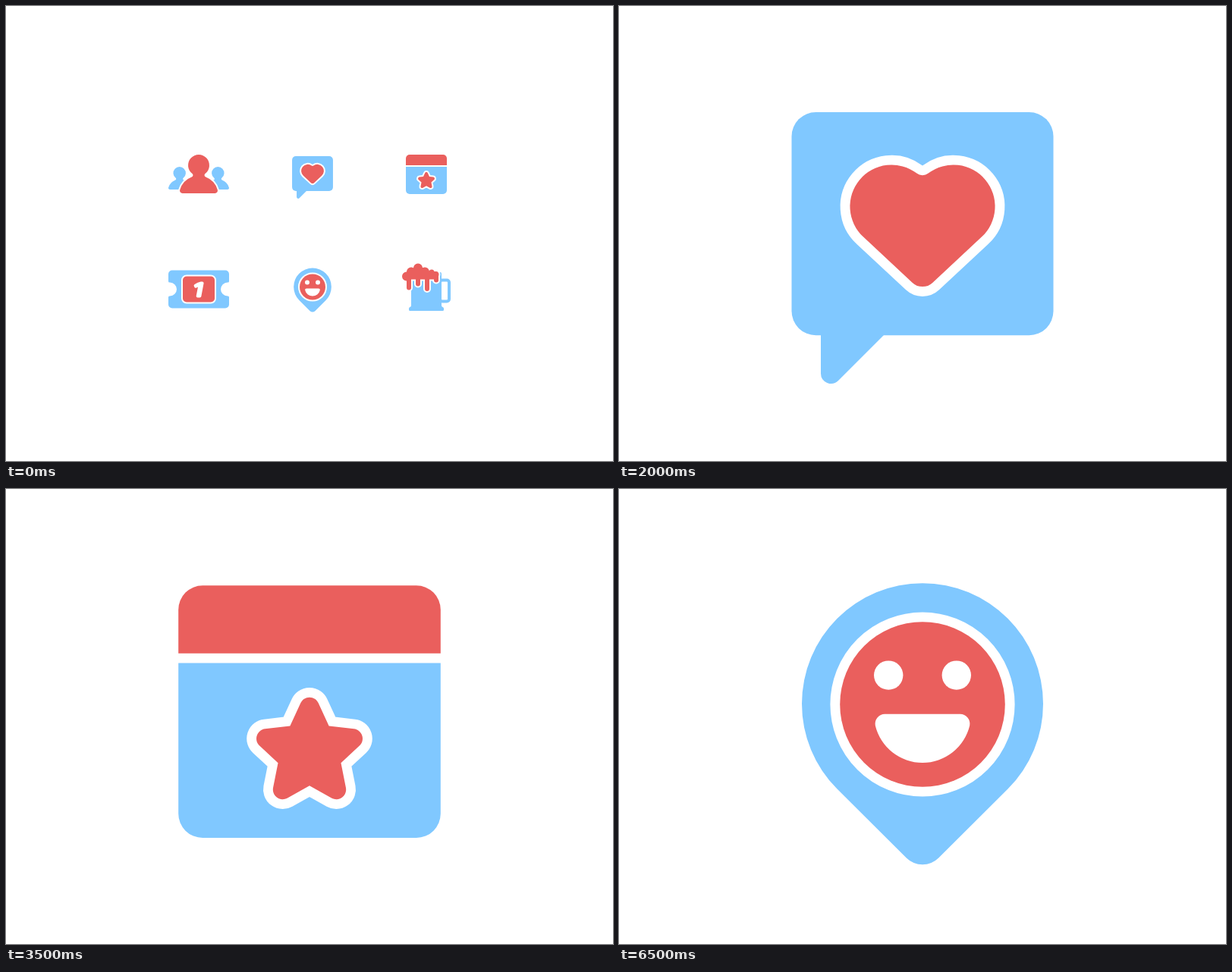
An HTML page with a canvas for the animation above (8000 ms loop, 800x600 px).

```html
<!DOCTYPE html>
<html lang="en">
<head>
<meta charset="utf-8">
<title>Icon set</title>
<style>
html, body { margin: 0; width: 100%; height: 100%; overflow: hidden; background: #fff; }
canvas { display: block; }
</style>
</head>
<body>
<canvas id="stage" width="800" height="600"></canvas>
<script>
const ctx = document.getElementById('stage').getContext('2d');
const RED = '#ea5f5d', BLUE = '#80c8ff', WHITE = '#fff';
const GAP = 12.8;           // white outline width at full size
const SMALL = 80 / 512;     // overview scale

function fill(path, color) {
  ctx.fillStyle = color;
  ctx.fill(path);
}

// Fills a path with a white outline around it.
function inset(path, color, gap = GAP) {
  ctx.strokeStyle = WHITE;
  ctx.lineWidth = gap * 2;
  ctx.lineJoin = 'miter';
  ctx.stroke(path);
  fill(path, color);
}

function disc(x, y, r) {
  const p = new Path2D();
  p.arc(x, y, r, 0, Math.PI * 2);
  return p;
}

function box(x0, y0, x1, y1, r) {
  const p = new Path2D();
  p.roundRect(x0, y0, x1 - x0, y1 - y0, r);
  return p;
}

function starPath(cx, cy, outer, inner, round) {
  const p = new Path2D();
  const at = (k, r) => {
    const a = k * Math.PI / 5 - Math.PI / 2;
    return [cx + r * Math.cos(a), cy + r * Math.sin(a)];
  };
  p.moveTo(...at(-1, inner));
  for (let k = 0; k < 10; k += 2) {
    p.arcTo(...at(k, outer), ...at(k + 1, inner), round);
    p.lineTo(...at(k + 1, inner));
  }
  p.closePath();
  return p;
}

const person = new Path2D(
  'M345 287.3A89.5 89.5 0 1 1 455 287.3A17 17 0 0 0 459.3 316.6' +
  'A165.5 165.5 0 0 1 559 425A22.5 22.5 0 0 1 537.4 453.7H262.6' +
  'A22.5 22.5 0 0 1 241 425A165.5 165.5 0 0 1 340.7 316.6A17 17 0 0 0 345 287.3Z');

const tail = new Path2D('M266 430V484.5A13.5 13.5 0 0 0 289 494L353 430Z');

const heart = new Path2D(
  'M407.7 220.6A54.8 54.8 0 0 1 477.9 304.6L413.2 364.9' +
  'A19.4 19.4 0 0 1 386.8 364.9L322.1 304.6A54.8 54.8 0 0 1 392.3 220.6' +
  'A12.8 12.8 0 0 0 407.7 220.6Z');

const star = starPath(400, 347.7, 90.8, 43.6, 12.9);

const stub = new Path2D(
  'M176 143.2H624A32 32 0 0 1 656 175.2V236A9.6 9.6 0 0 1 646.4 245.6H643.2' +
  'A57.6 57.6 0 0 0 643.2 360.8H646.4A9.6 9.6 0 0 1 656 370.4V431.2' +
  'A32 32 0 0 1 624 463.2H176A32 32 0 0 1 144 431.2V370.4' +
  'A9.6 9.6 0 0 1 153.6 360.8H156.8A57.6 57.6 0 0 0 156.8 245.6H153.6' +
  'A9.6 9.6 0 0 1 144 236V175.2A32 32 0 0 1 176 143.2Z');

const one = new Path2D(
  'M430 239C438 239 443.5 246 442 253L421.5 363C420 370 415.5 373.8 409 373.8H391' +
  'C383 373.8 377.5 367 379 359.5L393.5 284.5L381 291C374 294.5 366 291 363 284.5' +
  'L360 276.5C357.5 270 360.5 264 366 261L388 249.3C400 242.5 413 239 430 239Z');

const drop = new Path2D(
  'M287.5 395.6A159 159 0 1 1 512.5 395.6L421.2 486.6A30 30 0 0 1 378.8 486.6Z');

const mouth = new Path2D(
  'M350.4 296.8H449.6A12.8 12.8 0 0 1 462.2 312A64 64 0 0 1 337.8 312' +
  'A12.8 12.8 0 0 1 350.4 296.8Z');

const mug = new Path2D(
  'M534 351H572Q574 351 574 353V395Q574 396.5 575.5 397Q577 397.5 577 399V400.5' +
  'Q577 402 575.5 402H532.5Q531 402 531 400.5V399Q531 397.5 532.5 397Q534 396.5 534 395Z');

const foam = new Path2D();
[[528, 356.5, 6], [534, 350.5, 6], [543, 345.5, 6], [552, 350.5, 6],
 [561, 351, 3.5], [567, 354, 3.5]].forEach(c => foam.addPath(disc(...c)));
foam.addPath(box(528, 350, 570, 360.5, 3));
foam.addPath(box(536, 345, 556, 358, 2));
[[528, 374.5], [540, 369.5], [552, 376], [564, 364.5]]
  .forEach(([x, y]) => foam.addPath(box(x, 352, x + 6, y, 3)));

function people() {
  for (const x of [238, 562]) {
    ctx.save();
    ctx.translate(x, 282.3);
    ctx.scale(0.5885, 0.5885);
    ctx.translate(-400, -216.7);
    fill(person, BLUE);
    ctx.restore();
  }
  inset(person, RED);
}

function bubble() {
  fill(box(227.5, 140, 572.5, 434.3, 32), BLUE);
  fill(tail, BLUE);
  inset(heart, RED);
}

function calendar() {
  fill(box(227.2, 127.2, 572.8, 216.8, [32, 32, 0, 0]), RED);
  fill(box(227.2, 229.6, 572.8, 460, [0, 0, 32, 32]), BLUE);
  inset(star, RED);
}

function ticket() {
  fill(stub, BLUE);
  inset(box(265.6, 194.4, 534.4, 412, 32), RED);
  fill(one, WHITE);
}

function pin() {
  fill(drop, BLUE);
  inset(disc(400, 284, 108.8), RED);
  fill(disc(355.2, 245.6, 19.2), WHITE);
  fill(disc(444.8, 245.6, 19.2), WHITE);
  fill(mouth, WHITE);
}

function beer() {
  fill(mug, BLUE);
  ctx.strokeStyle = BLUE;
  ctx.lineWidth = 4;
  ctx.stroke(box(572, 361.5, 584, 389.5, 3));
  inset(foam, RED, 2);
}

function mini(draw, x, y) {
  ctx.save();
  ctx.translate(x, y);
  ctx.scale(SMALL, SMALL);
  ctx.translate(-400, -300);
  draw();
  ctx.restore();
}

function overview() {
  mini(people, 254, 223);
  mini(bubble, 404, 223);
  mini(calendar, 554, 223);
  mini(ticket, 254, 373);
  mini(pin, 404, 373);
  beer();
}

const scenes = [people, bubble, calendar, ticket, pin];
const INTRO = 500, HOLD = 1500;
const LOOP = INTRO + HOLD * scenes.length;
const start = performance.now();

function frame() {
  const t = (performance.now() - start) % LOOP;
  ctx.fillStyle = WHITE;
  ctx.fillRect(0, 0, 800, 600);
  if (t < INTRO) overview();
  else scenes[Math.floor((t - INTRO) / HOLD)]();
  requestAnimationFrame(frame);
}
frame();
</script>
</body>
</html>
```
